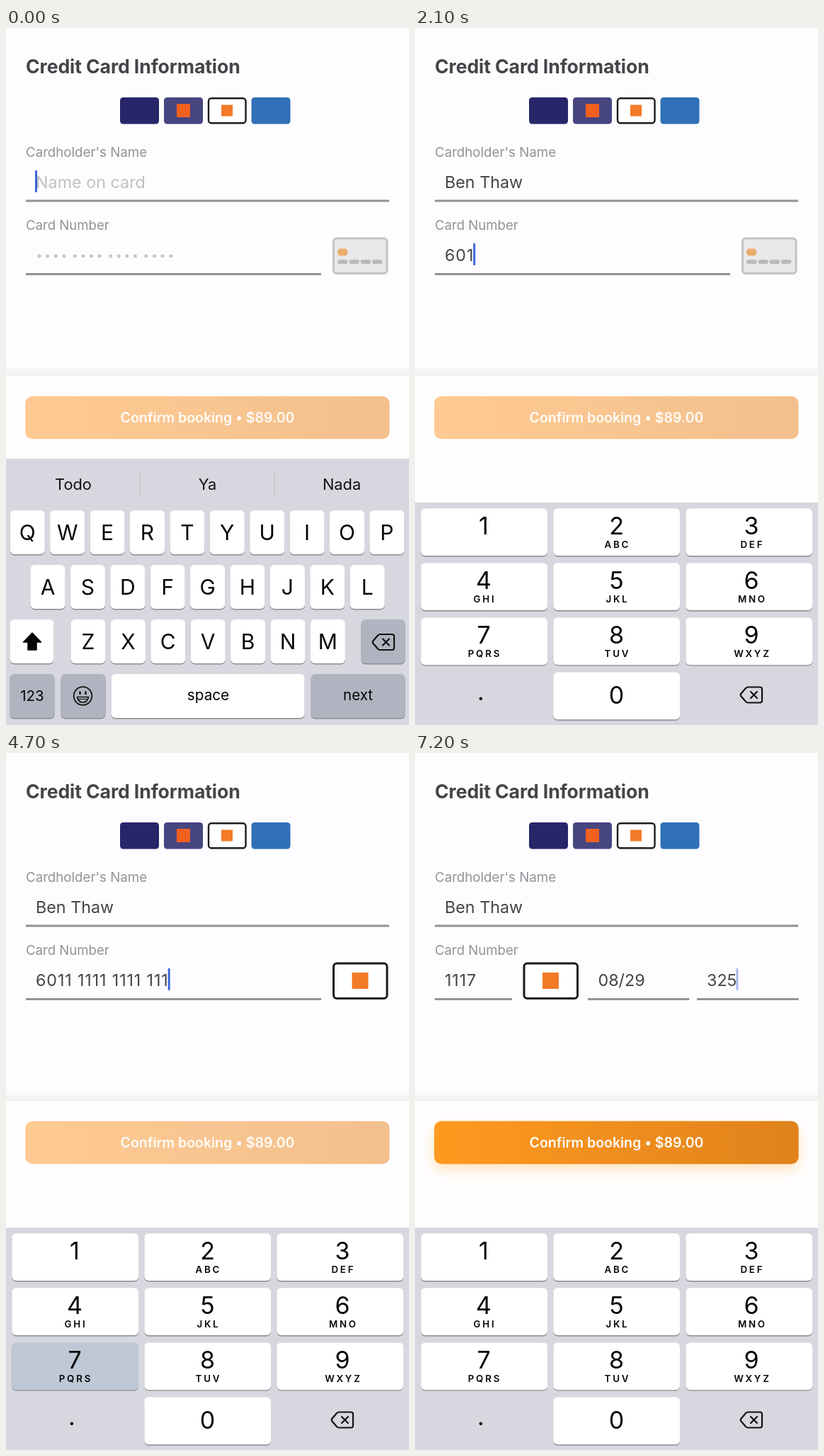
Animation, 569 px wide and 984 px high, one loop 7300 ms. Source, as an HTML page:

```html
<!DOCTYPE html>
<html lang="en">
<head>
<meta charset="utf-8">
<title>Card form</title>
<style>
html, body { margin: 0; width: 100%; height: 100%; overflow: hidden; background: #fdfcfe; }
svg { display: block; width: 569px; height: 984px; font-family: Inter, Roboto, "Liberation Sans", sans-serif; }
text { white-space: pre; }
.glow { filter: drop-shadow(0 8px 10px rgba(255, 184, 80, .38)); }
</style>
</head>
<body>
<svg id="stage" viewBox="0 0 569 984">
  <defs>
    <linearGradient id="pale"><stop stop-color="#ffca93"/><stop offset="1" stop-color="#f2c08d"/></linearGradient>
    <linearGradient id="vivid"><stop stop-color="#ff9a20"/><stop offset="1" stop-color="#e0821b"/></linearGradient>
    <linearGradient id="edge" x2="0" y2="1"><stop stop-color="#000" stop-opacity="0"/><stop offset="1" stop-color="#000" stop-opacity=".055"/></linearGradient>
    <clipPath id="numberClip"><rect id="numberBox" x="40" y="296" height="60"/></clipPath>
    <clipPath id="rowClip"><rect x="27" y="290" width="515" height="64"/></clipPath>
  </defs>
</svg>
<script>
const LOOP = 7300;
const NS = "http://www.w3.org/2000/svg";
const stage = document.getElementById("stage");
const INK = "#454448", GRAY = "#939297", HINT = "#c2c1c6";

function add(parent, tag, attrs = {}, content) {
  const node = document.createElementNS(NS, tag);
  for (const k in attrs) node.setAttribute(k, attrs[k]);
  if (content !== undefined) node.textContent = content;
  parent.appendChild(node);
  return node;
}
const group = (parent, attrs) => add(parent, "g", attrs);
const box = (parent, x, y, width, height, rx, fill, more) =>
  add(parent, "rect", { x, y, width, height, rx, fill, ...more });
const label = (parent, str, x, y, size, fill, more) =>
  add(parent, "text", { x, y, "font-size": size, fill, ...more }, str);
const mid = (parent, str, x, y, size, fill = "#050505", more) =>
  label(parent, str, x, y, size, fill, { "text-anchor": "middle", ...more });
const path = (parent, d, stroke, width, fill = "none") =>
  add(parent, "path", { d, stroke, "stroke-width": width, fill, "stroke-linejoin": "round", "stroke-linecap": "round" });
const rule = (parent, x1, x2, y) =>
  add(parent, "line", { x1, x2, y1: y, y2: y, stroke: GRAY, "stroke-width": 3.2 });
const show = (node, on) => node.setAttribute("visibility", on ? "inherit" : "hidden");
const write = (node, str) => { if (node.textContent !== str) node.textContent = str; };
const clamp = v => Math.max(0, Math.min(1, v));
const ease = v => v * v * (3 - 2 * v);

// Header
label(stage, "Credit Card Information", 28, 63.5, 26.6, INK, { "font-weight": 700, "letter-spacing": "-.1" });
box(stage, 161, 98, 55, 37.5, 4.5, "#28266a");
box(stage, 223, 98, 55, 37.5, 4.5, "#464580");
box(stage, 241, 107, 19, 19, 0, "#f2601f");
box(stage, 286, 99.2, 52.5, 35, 4, "#fff", { stroke: "#1e1b1c", "stroke-width": 2.4 });
box(stage, 304, 108.5, 16, 16, 0, "#f37b28");
box(stage, 346.5, 98, 55, 37.5, 4.5, "#2f70b8");

// Name field
label(stage, "Cardholder's Name", 28, 182, 18.7, GRAY);
const nameText = label(stage, "", 42, 225.5, 23.3, INK);
rule(stage, 28, 541, 244);

// Card row
label(stage, "Card Number", 28, 285, 18.6, GRAY);
const row = group(stage, { "clip-path": "url(#rowClip)" });
const numberArea = group(row, { "clip-path": "url(#numberClip)" });
const numberText = label(numberArea, "", 42, 328.5, 23.3, INK, { "letter-spacing": .87 });
const dots = group(row);
for (let i = 0; i < 16; i++)
  add(dots, "circle", { cx: 47 + (i >> 2) * 50.3 + (i % 4) * 11.6, cy: 322, r: 2.5, fill: "#c6c5ca" });
const numberRule = rule(row, 28, 445, 347.5);
const numberBox = document.getElementById("numberBox");

const icon = group(row);
const blankCard = group(icon);
box(blankCard, 462.5, 297, 75.5, 49.5, 4.5, "#e9e9eb", { stroke: "#c3c3c6", "stroke-width": 3 });
box(blankCard, 468, 311.5, 14.5, 10, 4.5, "#f0ae68");
path(blankCard, "M472 312v9M478 312v9M469 316.5h13", "#d9a878", 1);
for (let i = 0; i < 4; i++) box(blankCard, 468 + i * 16.3, 327, 14.5, 6, 3, "#bababd");
const knownCard = group(icon);
box(knownCard, 462.5, 297, 75.5, 49.5, 4.5, "#fff", { stroke: "#1c191a", "stroke-width": 3 });
box(knownCard, 488.5, 310, 23, 23, 0, "#f37b28");

const extra = group(row);
rule(extra, 244, 387.5, 347.5);
rule(extra, 398, 541.5, 347.5);
const expiryText = label(extra, "", 258.5, 328.5, 23.3, INK);
const cvcText = label(extra, "", 412, 328.5, 23.3, INK);
const cursor = box(stage, 0, 0, 3, 31, 1, "#3a66dc");

// Bottom sheet
box(stage, 0, 476, 569, 15.5, 0, "url(#edge)");
box(stage, 0, 491.5, 569, 493, 0, "#fffeff");
box(stage, 27.2, 519.8, 514.3, 60.5, 10, "url(#pale)");
const activeButton = box(stage, 27.2, 519.8, 514.3, 60.5, 10, "url(#vivid)", { class: "glow" });
mid(stage, "Confirm booking • $89.00", 284.5, 556.8, 19.5, "#fffdf9", { "font-weight": 600 });

function key(parent, x, y, w, h, fill = "#fff") {
  box(parent, x, y + 1.4, w, h, 6, "#8b8c91");
  return box(parent, x, y, w, h, 6, fill);
}
function eraseIcon(parent, x, y) {
  const g = group(parent, { transform: `translate(${x} ${y})` });
  path(g, "M11 1H28Q31 1 31 4V20Q31 23 28 23H11Q9.500 23 8 21.500L1.500 14Q0 12 1.500 10L8 2.500Q9.500 1 11 1Z", "#111", 2.2);
  path(g, "M15 7.500L24 16.500M24 7.500L15 16.500", "#111", 2.2);
}

// Letter keyboard
const DARK = "#b1b4c0", TRAY = "#d7d8df";
const letters = group(stage);
box(letters, 0, 608, 569, 376, 0, TRAY);
[189, 379].forEach(x => box(letters, x - .5, 626, 1, 35, 0, "#b9bbc3"));
const hints = [95, 284.5, 474].map(x => mid(letters, "", x, 651.5, 21.8, "#111"));

const weather = group(letters);
box(weather, 473, 626, 1, 35, 0, "#b9bbc3");
const flake = group(weather, { transform: "translate(426.500 643.500)" });
for (let i = 0; i < 6; i++) {
  const arm = group(flake, { transform: `rotate(${i * 60})` });
  path(arm, "M0 0V-13M-4 -12L0 -8L4 -12M-4 -7L0 -3.500L4 -7", "#5fb4ea", 1.9);
}
const man = group(weather, { transform: "translate(521 643)" });
path(man, "M-6 2L-12 -5M6 2L12 -5M-12 -5L-13 -1M12 -5L13 -1", "#6f625a", 1.6);
add(man, "circle", { cy: 7, r: 7.5, fill: "#f8fafc", stroke: "#c9d3dc" });
add(man, "circle", { cy: -3, r: 5.8, fill: "#f8fafc", stroke: "#c9d3dc" });
path(man, "M-7 -8H7M-4 -9V-13H4V-9Z", "#2b2b30", 1.8, "#2b2b30");
path(man, "M-2 -4v.1M2 -4v.1M0 5v.1M0 9v.1", "#333", 1.8);
path(man, "M0 -2L3 -1", "#ee8a35", 1.8);

const keyCaps = group(letters), upper = group(letters), lower = group(letters);
const keyRows = [["QWERTYUIOP", 30.3, 681], ["ASDFGHJKL", 59, 758], ["ZXCVBNM", 116, 835]];
for (const [chars, x0, y] of keyRows)
  [...chars].forEach((ch, i) => {
    const x = x0 + i * 56.4;
    key(keyCaps, x - 24.5, y, 49, 62);
    mid(upper, ch, x, y + 42.3, 30);
    mid(lower, ch.toLowerCase(), x, y + 39.5, 30.5);
  });
const ARROW = "M37 854L49.500 867H43V878H31V867H24.500Z";
key(upper, 5.5, 835, 62, 62);
path(upper, ARROW, "#050505", 1.5, "#050505");
key(lower, 5.5, 835, 62, 62, DARK);
path(lower, ARROW, "#111", 2.2);
key(letters, 501.5, 835, 62, 62, DARK);
eraseIcon(letters, 517, 855);
key(letters, 5.5, 912, 63, 62, DARK);
mid(letters, "123", 37, 949.5, 20.5);
key(letters, 77.5, 912, 63, 62, DARK);
add(letters, "circle", { cx: 108.5, cy: 943, r: 12.8, fill: "none", stroke: "#111", "stroke-width": 1.8 });
path(letters, "M104.500 937.500v2.500M112.500 937.500v2.500", "#111", 2.4);
path(letters, "M100.500 944.500H116.500Q115 952 108.500 952Q102 952 100.500 944.500Z", "#111", 1.6);
path(letters, "M102 947.500H115", "#111", 1.2);
key(letters, 148.5, 912, 273, 62);
mid(letters, "space", 285.5, 949, 20.7);
key(letters, 430.5, 912, 133, 62, DARK);
mid(letters, "next", 497, 949, 20.5);

// Number pad
const pad = group(stage), padKeys = {};
box(pad, 0, 670, 569, 314, 0, TRAY);
["", "ABC", "DEF", "GHI", "JKL", "MNO", "PQRS", "TUV", "WXYZ"].forEach((sub, i) => {
  const col = i % 3, y = 678.2 + (i / 3 | 0) * 77.1;
  const cx = [97, 284.5, 475][col];
  padKeys[i + 1] = key(pad, 8.3 + col * 187, y, 178.7, 66.8);
  mid(pad, i + 1, cx, y + 36.6, 34);
  mid(pad, sub, cx + 1.4, y + 56, 13.3, "#050505", { "font-weight": 600, "letter-spacing": 2.8 });
});
padKeys[0] = key(pad, 195.3, 909.5, 178.7, 66.8);
mid(pad, "0", 284.5, 953.5, 34);
mid(pad, ".", 93, 949, 34);
eraseIcon(pad, 459, 929.5);

// Timeline
const NAME = "Ben Thaw", NUMBER = "6011111111111117", EXPIRY = "0829", CVC = "325";
const nameTimes = [...NAME].map((_, i) => 60 + i * 90);
const numberTimes = [1600, 1900, 2100, 2300, 2550, 2800, 3050, 3160, 3270, 3380, 3490, 3590, 4260, 4440, 4600, 4780];
const expiryTimes = [5350, 5650, 5950, 6250];
const cvcTimes = [6450, 6620, 6850];
const TO_NUMBER = 1400, COLLAPSE = 4820, TO_EXPIRY = 5150, TO_CVC = 6320, READY = 6870;
const beats = [0, ...nameTimes, TO_NUMBER, ...numberTimes, TO_EXPIRY, ...expiryTimes, TO_CVC, ...cvcTimes];
const presses = [[NUMBER, numberTimes], [EXPIRY, expiryTimes], [CVC, cvcTimes]]
  .flatMap(([str, times]) => times.map((at, i) => [str[i], at]));

const typed = (str, times, t) => str.slice(0, times.filter(at => at <= t).length);
const spaced = str => str.replace(/(.{4})(?=.)/g, "$1 ");

function field(node, value, hint) {
  write(node, value || hint);
  node.setAttribute("fill", value ? INK : HINT);
}

function blink(t) {
  const idle = (t - beats.filter(b => b <= t).pop()) % 800;
  return idle < 400 ? 1 - clamp((idle - 290) / 110) : clamp((idle - 690) / 110);
}

function draw(t) {
  const name = typed(NAME, nameTimes, t);
  const number = typed(NUMBER, numberTimes, t);
  const digits = typed(EXPIRY, expiryTimes, t);
  const expiry = digits.length > 1 ? digits.slice(0, 2) + "/" + digits.slice(2) : digits;
  const cvc = typed(CVC, cvcTimes, t);
  const fold = ease(clamp((t - COLLAPSE) / 300));
  const onPad = t >= TO_NUMBER;

  field(nameText, name, "Name on card");
  field(expiryText, expiry, "MM/YY");
  field(cvcText, cvc, "CVC");
  write(numberText, spaced(number));
  show(dots, !number);
  show(blankCard, number.length < 4);
  show(knownCard, number.length >= 4);

  const hidden = fold && numberText.getSubStringLength(0, 15);
  numberText.setAttribute("x", 42 - hidden * fold);
  numberBox.setAttribute("width", 405 - 308 * fold);
  numberRule.setAttribute("x2", 445 - 308 * fold);
  icon.setAttribute("transform", `translate(${-308.5 * fold} 0)`);
  extra.setAttribute("transform", `translate(${308 * (1 - fold)} 0)`);
  show(extra, fold > 0);

  show(letters, !onPad);
  show(pad, onPad);
  const caps = !name || name.endsWith(" ");
  show(upper, caps);
  show(lower, !caps);
  const word = name.split(" ").pop(), done = name === NAME;
  const words = !name ? ["Todo", "Ya", "Nada"] : [word && `“${word}”`, done ? "Thawing" : "", ""];
  hints.forEach((node, i) => write(node, words[i]));
  show(weather, done);

  const pressed = presses.find(([, at]) => t >= at - 85 && t < at);
  for (const d in padKeys) padKeys[d].setAttribute("fill", pressed && pressed[0] === d ? "#bec8d6" : "#fff");

  const [node, value, x, y] =
    t < TO_NUMBER ? [nameText, name, 42, 201] :
    t < TO_EXPIRY ? [numberText, number, 42, 304] :
    t < TO_CVC ? [expiryText, expiry, 258.5, 304] : [cvcText, cvc, 412, 304];
  cursor.setAttribute("x", x - 1 + (value ? node.getComputedTextLength() : 0));
  cursor.setAttribute("y", y);
  cursor.setAttribute("opacity", t >= COLLAPSE && t < TO_EXPIRY ? 0 : blink(t));
  activeButton.setAttribute("opacity", clamp((t - READY) / 230));
}

const start = performance.now();
function tick() {
  draw((performance.now() - start) % LOOP);
  requestAnimationFrame(tick);
}
tick();
</script>
</body>
</html>
```
